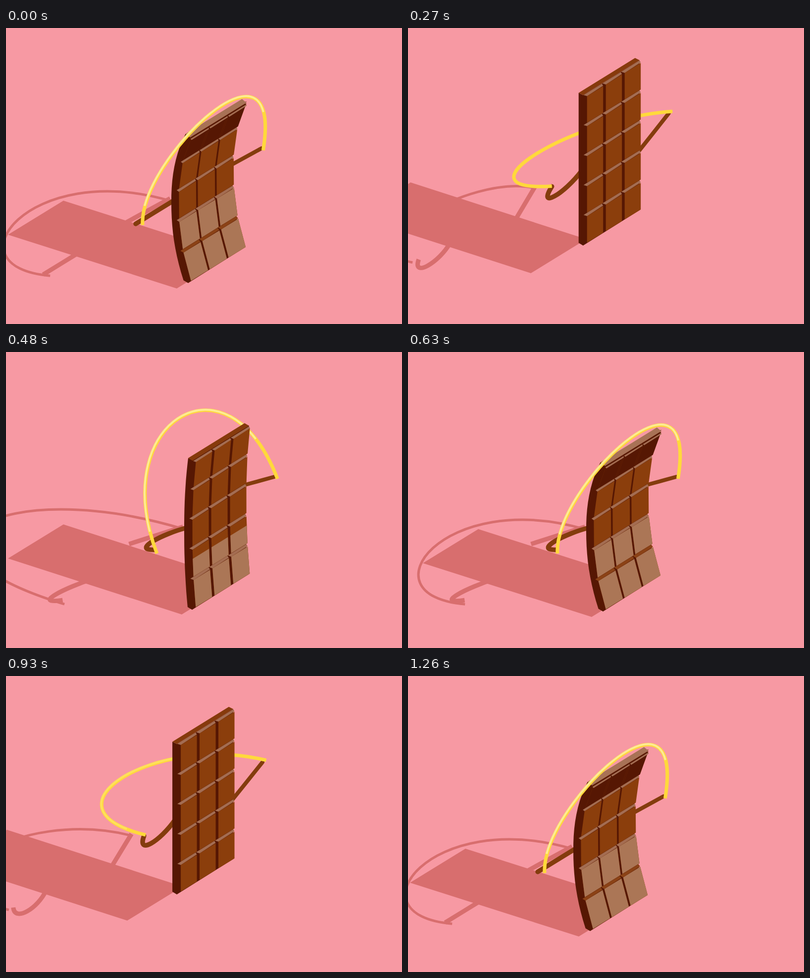
Write an HTML page that moves like this. It is 800 px wide and 600 px high and loops after 1.29 s.

```html
<!DOCTYPE html>
<html lang="en">
<head>
<meta charset="utf-8">
<title>Skipping chocolate bar</title>
<style>
  html, body { margin: 0; width: 100%; height: 100%; overflow: hidden; background: #f799a3; }
  svg { display: block; width: 100vw; height: 100vh; }
  .line { fill: none; stroke-linejoin: round; }
</style>
</head>
<body>
<svg viewBox="0 0 800 600">
  <g fill="#d86e6e" stroke="#d86e6e">
    <path id="barShade" stroke="none"/>
    <path id="armShadeL" class="line" stroke-width="9"/>
    <path id="armShadeR" class="line" stroke-width="9"/>
    <path id="ropeShade" class="line" stroke-width="5"/>
  </g>
  <g stroke="#843c0d" stroke-linecap="round">
    <path id="armL" class="line" stroke-width="9.5"/>
    <path id="armR" class="line" stroke-width="8"/>
  </g>
  <g id="back"></g>
  <g id="bar">
    <path id="body" fill="#561703"/>
    <path id="top"/>
    <path id="face" fill="#8b3e0c"/>
    <path id="lit" fill="#ab7656"/>
    <path id="dark" fill="#561703"/>
    <path id="bevel" fill="#a46d52"/>
    <path id="lowBevel"/>
  </g>
  <g id="front">
    <g id="rope">
      <path id="ropeBase" class="line" stroke="#ffd93b" stroke-width="7"/>
      <path id="ropeLight" class="line" stroke="#fdeb93" stroke-width="4" pathLength="1" stroke-dasharray="0 .08 .76 1"/>
    </g>
  </g>
</svg>
<script>
const STEP = 30, LOOP = 1290, JUMP = 630, LAND = 420;
const ROWS = 5, COLS = 3, PITCH = 60.8, COL = 38, SLOPE = 0.62;

const $ = id => document.getElementById(id);
const set = (id, d) => $(id).setAttribute("d", d);
const clamp = (v, a = 0, b = 1) => Math.min(b, Math.max(a, v));
const smooth = x => (x = clamp(x), x * x * (3 - 2 * x));
const tint = (a, b, k) => `rgb(${a.map((v, i) => Math.round(v + (b[i] - v) * k))})`;

const pt = p => p.map(v => v.toFixed(1)).join(" ");
const poly = pts => "M" + pts.map(pt).join("L") + "Z";
const curve = pts => "M" + pt(pts[0]) + "C" + pts.slice(1).map(pt).join(" ");
const add = ([x, y], [dx, dy], k = 1) => [x + dx * k, y + dy * k];
const move = (pts, d) => pts.map(p => add(p, d));
const line = (a, b) => [0, 1, 2, 3].map(i => [a[0] + (b[0] - a[0]) * i / 3, a[1] + (b[1] - a[1]) * i / 3]);
// Shadow on the floor of a point at height z
const cast = (p, z) => add(p, [-1.146, .63], z);

// Everything that follows from the time alone
function poseAt(t) {
  const phase = t % JUMP, u = clamp(phase / LAND);
  const travel = t % (2 * JUMP) < JUMP ? u ** 2 : (1 - u) ** 2;
  const h = Math.max(0, 75 * (1 - ((phase - 260) / 155) ** 2));
  const bend = Math.max(smooth(1 - phase / 110), smooth((phase - 400) / 230));
  const off = [26 * travel, 9 * travel];
  return { phase, travel, h, bend, off, lift: [off[0], off[1] - h], air: h / 75 };
}

// Swing angle, clockwise from straight up: whips under the feet, then coasts over
function swing(phase) {
  return phase < 150
    ? .1 + 3.2 * smooth(phase / 150)
    : 6.39 - 3.09 * (1 - (phase - 150) / 480) ** 1.4;
}

function drawBar({ bend: b, lift }) {
  const at = (x, w) => {
    const z = (w - 150) / 155, m = Math.abs(z), up = z < 0;
    return [
      x + b * (up ? 31 : 25) * m ** 2.2,
      207 - SLOPE * (x - 343) + w + b * (up ? 13 : 5) * m ** 2.3
    ];
  };
  const strip = (x0, x1, a, c) => poly([at(x0, a), at(x1, a), at(x1, c), at(x0, c)]);
  const rear = p => add(p, [-9, -4.5]);

  const ws = Array.from({ length: 21 }, (_, i) => i * 15.2);
  const left = ws.map(w => rear(at(343, w)));
  const right = ws.map(w => at(457, w)).reverse();
  set("body", poly([...left, at(343, 305), ...right, at(343, 0)]));

  const t0 = at(343, 0), t1 = at(457, 0), low = [0, 3 * b];
  set("top", poly([rear(t0), rear(t1), add(t1, low), add(t0, low)]));
  $("top").setAttribute("fill", tint([134, 58, 12], [168, 114, 86], clamp((b - .5) * 2)));

  // Light climbs from the bottom, the top row falls into shade
  const litFrom = 183 + 127 * (1 - b) ** 5;
  const curl = clamp((b - .4) / .5), darkTo = 62 * curl;
  const out = { face: "", lit: "", dark: "", bevel: "", lowBevel: "" };
  for (let r = 0; r < ROWS; r++) {
    const w = r * PITCH, a = w + 7, e = w + 61;
    for (let c = 0; c < COLS; c++) {
      const x = 343 + c * COL, x0 = x + 8 - 2 * b, x1 = x + 40.5;
      out.face += strip(x0, x1, a, e);
      if (litFrom < e) out.lit += strip(x0, x1, Math.max(a, litFrom), e);
      if (darkTo > a) out.dark += strip(x0, x1, a, Math.min(e, darkTo));
      const edge = [at(x + 1, w + .5), at(x + 38, w + .5), at(x1, w + 6), at(x0, w + 7)];
      out[r < ROWS - 1 ? "bevel" : "lowBevel"] += poly(move(edge, [0, r ? 0 : 6 * b]));
    }
  }
  for (const id in out) set(id, out[id]);
  $("lowBevel").setAttribute("fill", tint([164, 109, 82], [139, 66, 22], curl));
  $("bar").setAttribute("transform", `translate(${pt(lift)})`);
}

function drawBarShade({ bend: b, off, h }) {
  const foot = add([323 + 22 * b, 521 + 7 * b], add(off, [-1.146, -.37], h));
  const side = [112, -69], tall = [-355 + 14 * b, -115 + 6 * b];
  const far = add(foot, side);
  set("barShade", poly([foot, far, add(far, tall), add(foot, tall)]));
}

function drawArm(side, pts, { lift, h }) {
  const placed = move(pts, lift);
  set("arm" + side, curve(placed));
  set("armShade" + side, curve(placed.map((p, i) => {
    const [x, y] = pts[i], sag = y - 349 + SLOPE * (x - 340);
    return cast(p, 163 + h - sag / 2);
  })));
}

function drawArms(pose) {
  const sag = pose.air ** 1.3, hook = pose.travel ** 2;
  const sagBy = [[0, 12], [-6, 44], [-28, 57], [16, -4]];
  const hookBy = [[0, -2], [-22, -6], [-62, 12], [12, -5]];
  const left = line([340, 349], [262, 397])
    .map((p, i) => add(add(p, sagBy[i], sag), hookBy[i], hook));
  const right = line([425, 294], [516, 244])
    .map((p, i) => add(p, [0, 1 - i / 3], 70 * sag - 25 * hook));
  drawArm("L", left, pose);
  drawArm("R", right, pose);
}

function drawRope({ phase, bend, lift, h, air }) {
  const raise = 8 * Math.min(1, 2 * air);
  const p = add([280 - 4 * bend, 399.5 - raise], lift), q = add(p, [243.5, -151.5]);

  const angle = swing(phase);
  const near = Math.cos(2 * Math.PI * phase / JUMP - .44);
  const reach = 1 - .16 * near, skew = clamp(2 * near);
  const fwd = reach * Math.sin(angle), up = reach * Math.cos(angle);
  const pull = [200 * fwd, 85 * fwd - 240 * up], lean = [26, -70];
  const k1 = add(pull, lean, -skew), k2 = add(pull, lean, skew);
  const pts = [p, add(p, k1), add(q, k2), q];
  set("ropeBase", curve(pts));
  set("ropeLight", curve(move(pts, [-.7, -.9])));
  $("ropeLight").setAttribute("opacity", clamp(-pull[1] / 150).toFixed(2));

  const z = 163 + h + raise;
  const rise = ([x, y]) => x * (x > 0 ? .5 : .25) - y;
  const zs = [z, z + rise(k1) + 50 * skew, z + rise(k2), z];
  set("ropeShade", curve(pts.map((v, i) => cast(v, zs[i]))));

  const home = $(phase < 130 || phase > 550 ? "front" : "back");
  if ($("rope").parentNode !== home) home.appendChild($("rope"));
}

function draw(time) {
  const pose = poseAt(Math.floor(time % LOOP / STEP) * STEP);
  drawBarShade(pose);
  drawArms(pose);
  drawBar(pose);
  drawRope(pose);
}

function tick() {
  draw(performance.now());
  requestAnimationFrame(tick);
}
draw(0);
requestAnimationFrame(tick);
</script>
</body>
</html>
```
